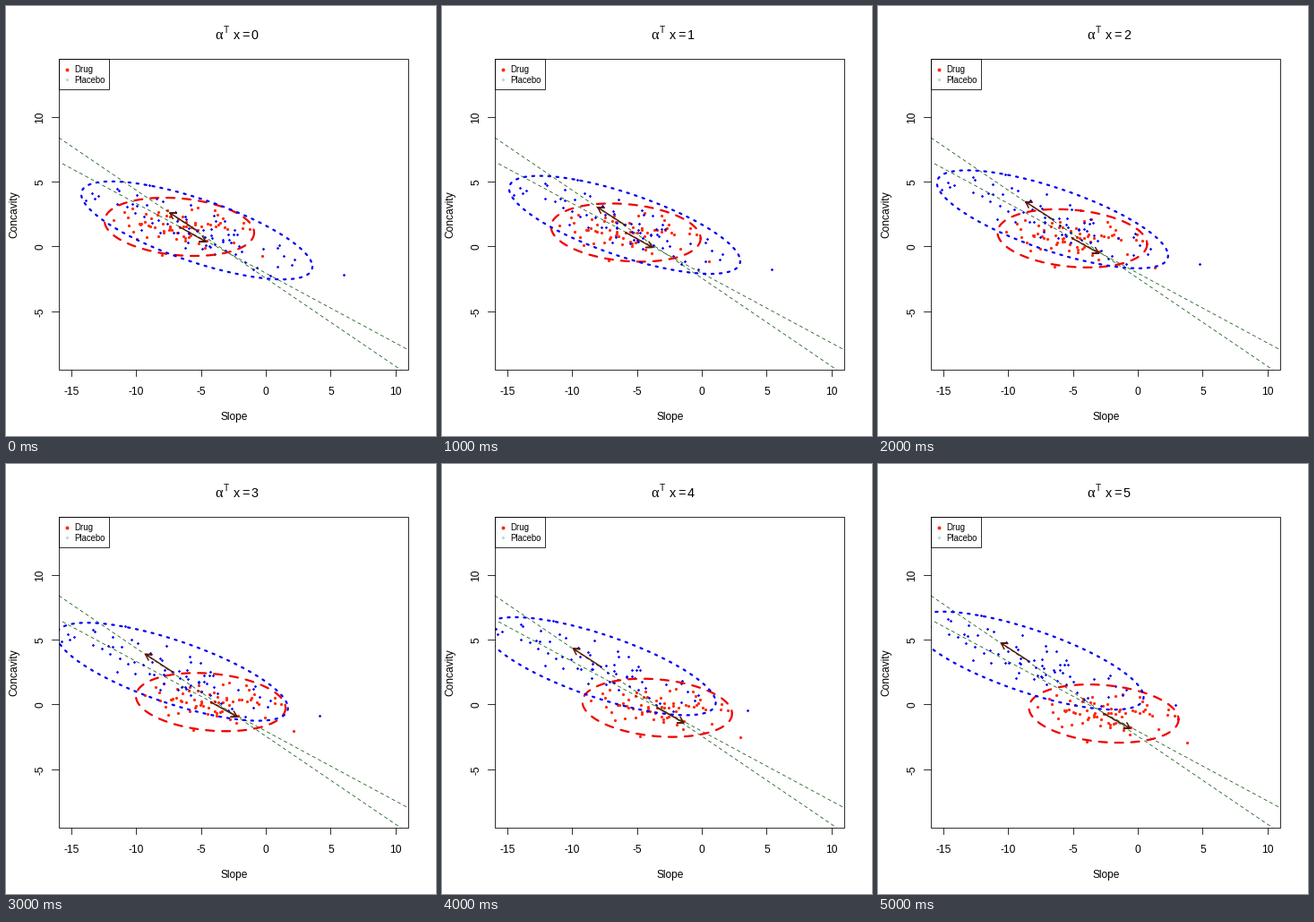
Write a matplotlib script that moves like this. It is 480 px wide and 480 px high and loops after 6000 ms.

```python
import numpy as np
import matplotlib.pyplot as plt
from matplotlib.animation import FuncAnimation

SIZE, DPI, STEPS = 480, 72, 6
LEFT, RIGHT, TOP, BOTTOM = 59.04, 449.76, 59.04, 406.56
UNIT = (RIGHT - LEFT) / 27
SANS = "Liberation Sans"

fig = plt.figure(figsize=(SIZE / DPI, SIZE / DPI), dpi=DPI, facecolor="white")
ax = fig.add_axes([0, 0, 1, 1])
ax.set(xlim=(0, SIZE), ylim=(SIZE, 0))
ax.axis("off")


def px(x):
    return LEFT + (x + 16) * UNIT


def py(y):
    return TOP + (14.5 - y) * UNIT


def line(xs, ys, color, width, **kw):
    return ax.plot(xs, ys, color=color, lw=width, **kw)[0]


def rule(xs, ys, z=6):
    """Black hairline on pixel centres."""
    line(np.floor(xs) + 0.5, np.floor(ys) + 0.5, "black", 0.8, snap=False,
         solid_joinstyle="miter", zorder=z)


def box(x0, y0, x1, y1, z):
    rule([x0, x1, x1, x0, x0], [y0, y0, y1, y1, y0], z)


def label(x, y, s, size=12, font=SANS, **kw):
    return ax.text(x, y, s, fontsize=size, family=font, va="baseline", **kw)


def label_up(x, y, s):
    label(x, y, s, ha="center", rotation=90, rotation_mode="anchor")


class Group:
    """A sample with its ellipse and shift arrow, moved as one."""

    def __init__(self, seed, count, outer, center, half, rho, head, shift,
                 color, marker, dash):
        self.center, self.half, self.rho = np.array(center), half, rho
        self.shift = np.array(shift)
        self.oval = self.spread(1, np.linspace(0, 2 * np.pi, 300))

        # Normal cloud, cut off just inside the 95% ellipse
        rng = np.random.default_rng(seed)
        radius = np.sqrt(-2 * np.log(np.linspace(0.08, 1, count))) / 2.45
        cloud = self.spread(radius, rng.uniform(0, 2 * np.pi, count))
        self.pts = np.vstack([cloud, outer])

        tip = self.center + head
        back = np.arctan2(-head[1], -head[0])
        barbs = [tip + 7.2 * np.array([np.cos(a), np.sin(a)])
                 for a in (back - np.pi / 6, back + np.pi / 6)]
        self.arrow = np.array([self.center, tip, barbs[0], tip, barbs[1]])

        self.dots = line([], [], color, 0, mec="none", zorder=2, **marker)
        self.ring = line([], [], color, 2.25, ls=(0, dash),
                         dash_capstyle="round", zorder=4)
        self.shaft = line([], [], "#5a1a08", 1.5, zorder=5,
                          solid_joinstyle="round")
        clip = plt.Rectangle((LEFT, TOP), RIGHT - LEFT, BOTTOM - TOP,
                             transform=ax.transData)
        for art in (self.dots, self.ring, self.shaft):
            art.set_clip_path(clip)

    def spread(self, r, t):
        u, v = r * np.cos(t), r * np.sin(t)
        tilted = self.rho * u + np.sqrt(1 - self.rho ** 2) * v
        return self.center + np.column_stack([u, tilted]) * self.half

    def move(self, k):
        for art, xy in ((self.dots, self.pts), (self.ring, self.oval),
                        (self.shaft, self.arrow)):
            art.set_data(*(xy + k * self.shift).T)
        return [self.dots, self.ring, self.shaft]


# Axes
box(LEFT, TOP, RIGHT, BOTTOM, 6)
for v in range(-15, 11, 5):
    rule([px(v), px(v)], [BOTTOM, BOTTOM + 7.2])
    label(px(v) - 0.5, 433.6, str(v), ha="center")
for v in range(-5, 11, 5):
    rule([LEFT - 7.2, LEFT], [py(v), py(v)])
    label_up(41.2, py(v), str(v))
label(254.4, 462, "Slope", ha="center")
label_up(12.6, 232.4, "Concavity")

# Legend
box(LEFT, TOP, 115.4, 93.6, 7)
for y, name, color, mark, size in ((70.5, "Drug", "#ff2a0a", "o", 4),
                                   (82.3, "Placebo", "lightblue", "D", 2.8)):
    ax.plot(67.6, y, mark, ms=size, color=color, mec="none", zorder=7)
    label(76, y + 3.5, name, 9.6)

# Title
label(233.2, 37, "α", 16.3, "Liberation Serif")
label(243.2, 30.3, "T", 10)
label(254, 37, "x", 14.4)
label(263.2, 37, "=", 14.4)
digit = label(273.8, 37, "0", 14.4)

# Guide lines
for xs, ys in (((59, 440.5), (147, 406)), ((63, 447.5), (176, 383))):
    line(xs, ys, "#145a14", 0.8, ls=(0, (5, 4)), zorder=3)

groups = [
    Group(seed=4, count=64,
          outer=[(286, 279), (272, 249), (174, 278), (132, 230), (233, 228)],
          center=(193.5, 246.5), half=(83.5, 32.5), rho=0.2,
          head=(29.5, 16.5), shift=(11.7, 6.42), color="#f00000",
          marker=dict(marker="o", ms=3.2, mfc="#ff2a0a"), dash=(4, 4)),
    Group(seed=11, count=64,
          outer=[(377, 300), (322, 283), (310, 279), (160, 200), (96, 209),
                 (89, 217), (103, 212), (126, 206), (206, 222)],
          center=(213, 250.5), half=(129, 54.7), rho=0.74,
          head=(-30, -19.5), shift=(-9.1, -6.2), color="#0000f5",
          marker=dict(marker="D", ms=2.4), dash=(1, 3)),
]


def draw(k):
    digit.set_text(str(k))
    return [digit] + [art for g in groups for art in g.move(k)]


anim = FuncAnimation(fig, draw, frames=STEPS, interval=1000, repeat=True,
                     repeat_delay=0, init_func=lambda: draw(0))
plt.show()
```
